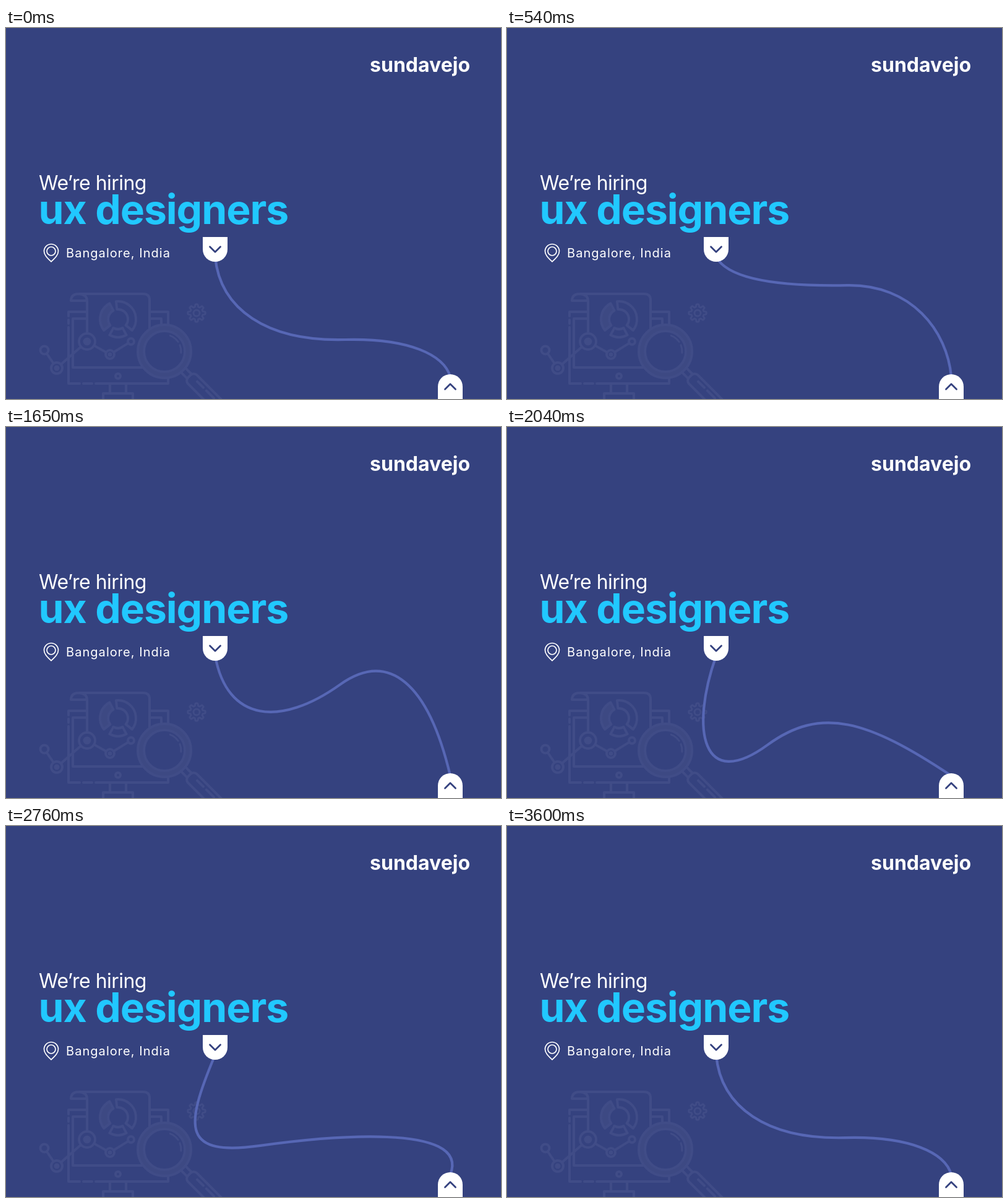
An HTML page with a canvas that plays this animation: 800x600 px, repeating every 3660 ms.

```html
<!DOCTYPE html>
<html lang="en">
<head>
<meta charset="utf-8">
<title>We’re hiring</title>
<style>
  html, body { margin: 0; width: 100%; height: 100%; overflow: hidden; background: #35427f; }
  canvas { display: block; }
</style>
</head>
<body>
<canvas id="stage" width="800" height="600"></canvas>
<script>
const ctx = document.getElementById('stage').getContext('2d');
const LOOP = 3660, BG = '#35427f', ART = '#404c87', ART_FILL = '#3d4983';
const FONT = 'Inter, "Noto Sans", sans-serif';
const TOP = [338, 370], BOTTOM = [718, 564];

// The cable hangs on one moving knot. Handles: out of the top plug,
// through the knot (pull), and into the bottom plug.
const pose = (out, knot, pull, into) => ({ out, knot, pull, into });
const rest = pose([346, 454], [548, 504], [116, -3], [708, 529]);
const lifted = pose([356, 395], [550, 404], [116, -2], [712, 485]);
const wave = pose([359, 477], [543, 414], [87, -62], [685, 412]);
const dropped = pose([295, 490], [420, 515], [96, -70], [581, 474]);
const swung = pose([287, 491], [410, 517], [114, -16], [752, 478]);
const settling = pose([286, 491], [465, 514], [112, -5], [758, 492]);
const MOVES = [
  { at: 15, to: rest }, { at: 780, to: lifted }, { at: 1545, to: wave },
  { at: 2115, to: dropped }, { at: 2680, to: swung }, { at: 3150, to: settling },
  { at: LOOP + 15, to: rest }
];

const easeInOut = u => u < 0.5 ? 4 * u ** 3 : 1 - 4 * (1 - u) ** 3;

function poseAt(time) {
  const next = Math.max(1, MOVES.findIndex(m => m.at > time));
  const a = MOVES[next - 1], b = MOVES[next];
  const s = easeInOut(Math.max(0, (time - a.at) / (b.at - a.at)));
  const mix = key => a.to[key].map((v, i) => v + (b.to[key][i] - v) * s);
  return pose(mix('out'), mix('knot'), mix('pull'), mix('into'));
}

function cable(time) {
  const { out, knot, pull, into } = poseAt(time);
  const along = k => knot.map((v, i) => v + k * pull[i]);
  ctx.beginPath();
  ctx.moveTo(...TOP);
  ctx.bezierCurveTo(...out, ...along(-1.1), ...knot);
  ctx.bezierCurveTo(...along(0.9), ...into, ...BOTTOM);
  ctx.strokeStyle = '#5767b5';
  ctx.lineWidth = 4.2;
  ctx.stroke();
}

function paint(path, color, width, fill) {
  if (fill) { ctx.fillStyle = fill; ctx.fill(path); }
  ctx.strokeStyle = color;
  ctx.lineWidth = width;
  ctx.stroke(path);
}
const line = (d, color = ART, width = 4) => paint(new Path2D(d), color, width);

function arc(x, y, r, from, to, color = ART, width = 4, fill) {
  const p = new Path2D();
  p.arc(x, y, r, from * Math.PI / 180, to * Math.PI / 180);
  paint(p, color, width, fill);
}
const circle = (x, y, r, ...style) => arc(x, y, r, 0, 360, ...style);

function ringPart(x, y, from, to, fill) {
  const p = new Path2D(), rad = Math.PI / 180;
  p.arc(x, y, 29, from * rad, to * rad);
  p.arc(x, y, 16, to * rad, from * rad, true);
  p.closePath();
  paint(p, ART, 4, fill);
}

function gear(x, y) {
  const p = new Path2D();
  for (let a = 0; a < 2 * Math.PI; a += Math.PI / 48) {
    const r = 12.2 + 2 * Math.tanh(3 * Math.cos(8 * a));
    p.lineTo(x + r * Math.cos(a), y + r * Math.sin(a));
  }
  p.closePath();
  paint(p, ART, 3);
  circle(x, y, 5, ART, 3);
}

function monitor() {
  line('M131 459H101V466 M101 472V478 M101 484V575H119 M125 575H139 M145 575H262V567');
  line('M131 470H108V549H224 M232 459H262V481 M232 470H251V481');
  circle(181, 563, 4);
  line('M168 577V591 M194 577V591 M157 600V591H205V600');
}

function sheet() {
  line('M131 494V441H105Q105 430 118 430H222Q232 430 232 440V486 M118 430Q131 431 131 441');
  ringPart(181, 471, -96, 38);
  ringPart(181, 471, 62, 118);
  ringPart(181, 471, 142, 242, ART_FILL);
}

function chart() {
  const nodes = [[62, 521, 6.5], [82, 550, 9], [131, 507, 13], [168, 528, 7], [202, 507, 5]];
  nodes.forEach(([x, y, r], i) => {
    circle(x, y, r);
    if (r > 6.5) circle(x, y, r / 2 - 1, ART, 2, ART);
    if (i === 0) return;
    const [px, py, pr] = nodes[i - 1], len = Math.hypot(x - px, y - py);
    const dx = (x - px) / len, dy = (y - py) / len;
    line(`M${px + dx * pr} ${py + dy * pr}L${x - dx * r} ${y - dy * r}`);
  });
}

function magnifier() {
  ctx.save();
  ctx.translate(256, 523);
  circle(0, 0, 38, ART_FILL, 9);
  circle(0, 0, 43);
  circle(0, 0, 33);
  arc(0, 0, 27, -70, -35, ART, 3);
  arc(0, 0, 27, -22, 5, ART, 3);
  ctx.rotate(Math.PI / 4);
  line('M43 -5H57 M43 5H57 M72 -3H86 M93 -3H110');
  const grip = new Path2D();
  grip.roundRect(57, -10, 100, 20, 7);
  paint(grip, ART, 4);
  ctx.restore();
}

function text(str, x, y, size, weight, spacing, color, align = 'left') {
  ctx.font = `${weight} ${size}px ${FONT}`;
  ctx.letterSpacing = spacing + 'px';
  ctx.textAlign = align;
  ctx.fillStyle = color;
  ctx.fillText(str, x, y);
}

function plug(x, y, radii, dir) {
  ctx.beginPath();
  ctx.roundRect(x - 20, y, 40, 40, radii);
  ctx.fillStyle = '#fff';
  ctx.fill();
  const mid = y + 20, h = 4.2 * dir;
  line(`M${x - 8.5} ${mid - h}L${x} ${mid + h}L${x + 8.5} ${mid - h}`, BG, 2.8);
}

function pin() {
  line('M73 378C67 372 61.5 367 61.5 361A11.5 11.5 0 0 1 84.5 361C84.5 367 79 372 73 378Z', '#fff', 1.7);
  circle(73, 361, 7, '#fff', 1.7);
}

function draw(time) {
  ctx.fillStyle = BG;
  ctx.fillRect(0, 0, 800, 600);
  ctx.lineCap = ctx.lineJoin = 'round';
  monitor();
  sheet();
  chart();
  gear(308, 461);
  magnifier();
  cable(time);
  plug(338, 338, [0, 0, 20, 20], 1);
  plug(718, 560, [20, 20, 0, 0], -1);
  text('sundavejo', 750, 71, 32, 700, 0, '#fff', 'right');
  text('We’re hiring', 53, 262, 32, 400, -0.5, '#fff');
  text('ux designers', 52.5, 317, 66, 700, -1.1, '#21c8ff');
  text('Bangalore, India', 97, 371, 20, 400, 1.05, '#fff');
  pin();
}

const start = performance.now();
function tick() {
  draw((performance.now() - start) % LOOP);
  requestAnimationFrame(tick);
}
tick();
</script>
</body>
</html>
```
